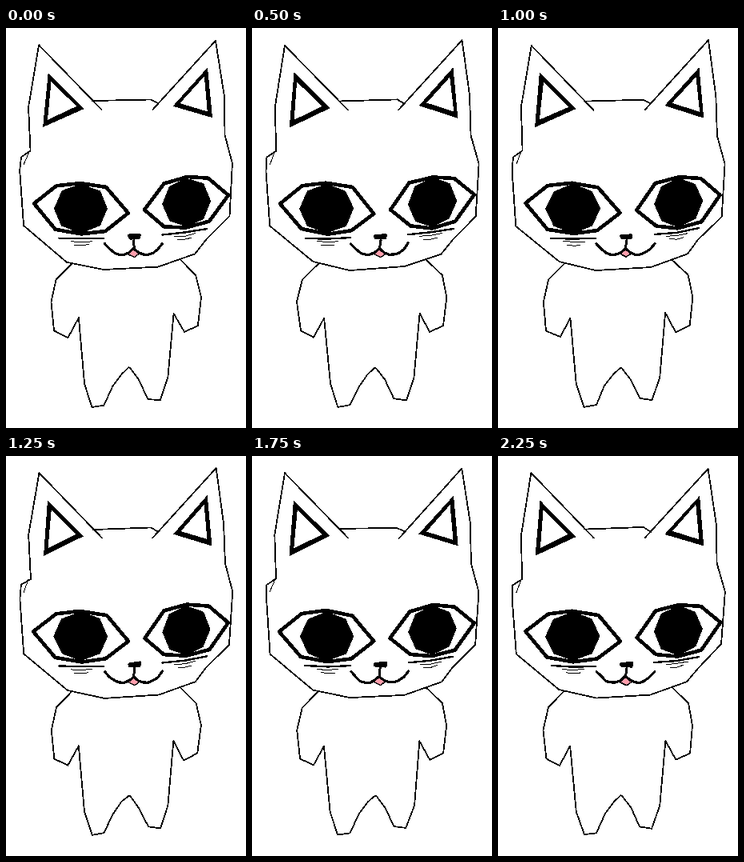
An HTML page that plays this animation: 300 by 500 pixels, repeating every 2500 ms.

```html
<!DOCTYPE html>
<html lang="en">
<head>
<meta charset="utf-8">
<title>Wobbly cat</title>
<style>
  html, body { margin: 0; width: 100%; height: 100%; overflow: hidden; background: #fff; }
  svg { display: block; width: 300px; height: 500px; }
</style>
</head>
<body>
<svg id="stage" viewBox="0 0 300 500" shape-rendering="crispEdges"
     stroke-linejoin="round" stroke-linecap="round"></svg>
<script>
const STEP = 250, STEPS = 10, WOBBLE = 0.6;
const INK = "#000", PAPER = "#fff", PINK = "#ff9dab";
const stage = document.getElementById("stage");
const shapes = [];

const parse = text => text.split(" ").map(p => p.split(",").map(Number));
const range = (n, rule) => Array.from({ length: n }, (_, i) => rule(i));

// Each shape keeps its resting points, which every step shakes anew.
function shape(pts, line = 1.8, fill = "none", closed = false) {
  const el = document.createElementNS("http://www.w3.org/2000/svg", "path");
  el.setAttribute("fill", fill);
  el.setAttribute("stroke", line ? INK : "none");
  el.setAttribute("stroke-width", line);
  stage.append(el);
  shapes.push({ el, pts, closed });
}

// The right half of the body mirrors the left one, a little higher.
function body() {
  const left = parse("82,294 62,314 56,342 60,378 77,386 90,362 97,444 107,473 122,471 133,447 144,432");
  const right = left.map(([x, y]) => [299 - x, y * 0.983]).reverse();
  shape([...left, [153, 424], ...right]);
}

function head() {
  shape(parse("119,102 41,21 28,98 30,153 18,161 17,178 22,247 76,292 122,302 " +
              "190,298 236,282 250,264 279,235 283,169 273,134 272,84 262,15 183,102"), 1.8, PAPER);
  shape(parse("108,91 181,89 190,94"));
  shape(parse("28,154 22,170"), 1);
}

function ear(outer) {
  const middle = k => outer.reduce((sum, p) => sum + p[k], 0) / 3;
  const centre = [middle(0), middle(1)];
  const inner = outer.map(p => p.map((v, k) => centre[k] + (v - centre[k]) * 0.69));
  shape(outer, 0, INK, true);
  shape(inner, 0, PAPER, true);
}

// Half the lid is given, the other half is its point reflection.
function eye(cx, cy, width, tilt) {
  const place = ([x, y]) => [cx + x * width, cy + y + x * tilt];
  const lid = parse("-59,-6 -31,-28 -1,-32 32,-26");
  const pupil = range(8, i => [34 * Math.cos(i * Math.PI / 4), 31 * Math.sin(i * Math.PI / 4)]);
  shape([...lid, ...lid.map(([x, y]) => [-x, -y])].map(place), 4.6, "none", true);
  shape(pupil.map(place), 0, INK, true);
}

function whiskers(cx, cy, tilt) {
  for (let i = 0; i < 3; i++) {
    const half = 28 / (1 + 1.1 * i), y = cy + 4.2 * i;
    shape([[cx - half, y - half * tilt], [cx, y + 1], [cx + half, y + half * tilt]], i ? 1 : 2.4);
  }
}

function muzzle() {
  shape(parse("150,281 159,276 167,281 160,286"), 1.5, PINK, true);
  for (const side of [-1, 1])
    shape(range(7, i => [159 + side * 6 * i, 275 + 6.2 * i - 1.2 * i * i]), 3.2);
  shape(parse("160,264 159,275"), 3);
  shape(parse("153,259 167,258 166,262 154,262"), 3.2, INK, true);
}

body();
head();
ear(parse("52,55 97,100 46,124"));
ear(parse("251,49 208,97 257,112"));
eye(93, 225, 1, 0);
eye(225, 217.5, -0.89, 0.06);
whiskers(94, 262, 0);
whiskers(223, 254, -0.14);
muzzle();

// Repeatable noise from -1 to 1
function noise(seed) {
  const n = Math.sin(seed * 12.9898) * 43758.5453;
  return 2 * (n - Math.floor(n)) - 1;
}

function draw(step) {
  let seed = step * 1000 + 1;
  const shake = v => (v + 0.5 + WOBBLE * noise(seed++)).toFixed(2);
  for (const { el, pts, closed } of shapes)
    el.setAttribute("d", "M" + pts.map(p => p.map(shake)).join("L") + (closed ? "Z" : ""));
}

let shown = -1;
const start = performance.now();
function tick() {
  const step = Math.floor((performance.now() - start) / STEP) % STEPS;
  if (step !== shown) draw(shown = step);
  requestAnimationFrame(tick);
}
tick();
</script>
</body>
</html>
```
